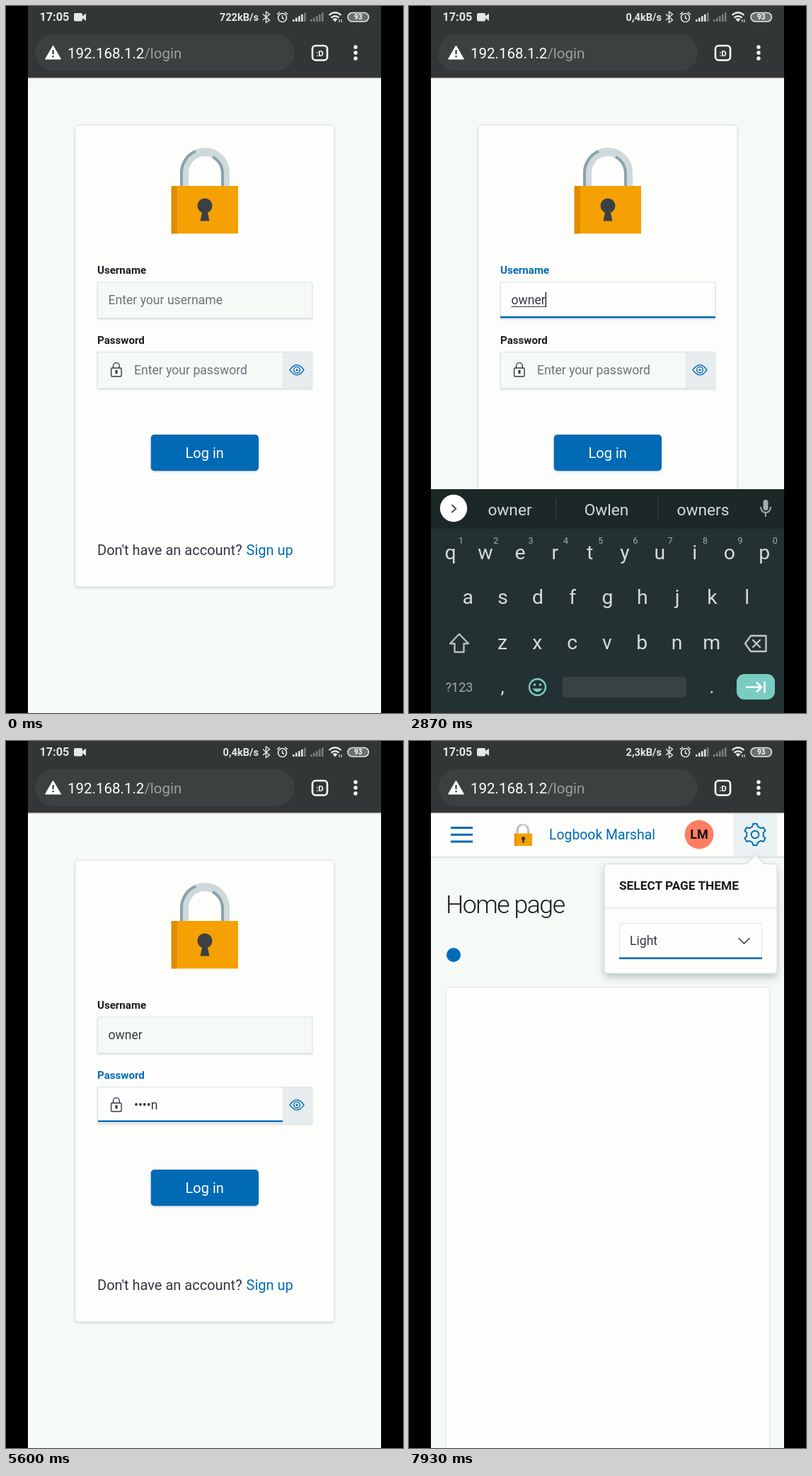
These frames come from a looping animation (561x998 px, 8 s). An HTML page:

```html
<!DOCTYPE html>
<html lang="en">
<head>
<meta charset="utf-8">
<title>Login on a phone</title>
<style>
html, body { margin: 0; width: 100%; height: 100%; overflow: hidden; background: #000; }
svg { display: block; width: 100vw; height: 100vh; font-family: Roboto, sans-serif; }
text { white-space: pre; }
</style>
</head>
<body>
<svg id="stage" viewBox="0 0 561 998"></svg>
<script>
const LOOP = 8000;
const BLUE = '#006bb4', INK = '#343741', DARK = '#1a1c21', HINT = '#6c737c';
const PAGE = '#f6faf7', CARD = '#fdfdfb', KEY = '#d6dada', TOOL = '#a6abac', STRIP = '#1c2728';

// Markup helpers
const text = (x, y, s, size, fill, more = '') =>
  `<text x="${x}" y="${y}" font-size="${size}" fill="${fill}" ${more}>${s}</text>`;
const rect = (x, y, w, h, fill, more = '') =>
  `<rect x="${x}" y="${y}" width="${w}" height="${h}" fill="${fill}" ${more}/>`;
const disc = (x, y, r, fill, more = '') => `<circle cx="${x}" cy="${y}" r="${r}" fill="${fill}" ${more}/>`;
const line = (d, stroke, w = 2, more = '') =>
  `<path d="${d}" fill="none" stroke="${stroke}" stroke-width="${w}" ${more}/>`;
const shape = (d, fill, more = '') => `<path d="${d}" fill="${fill}" ${more}/>`;
const group = (id, body, more = '') => `<g id="${id}" ${more}>${body}</g>`;
const MID = 'text-anchor="middle"', BOLD = 'font-weight="700"', ROUND = 'stroke-linejoin="round" stroke-linecap="round"';

function gear(cx, cy, r, depth, teeth) {
  const pts = [];
  for (let i = 0; i < teeth; i++) {
    [[-.3, 1 - depth], [-.17, 1], [.17, 1], [.3, 1 - depth]].forEach(([o, k]) => {
      const a = (i + o) / teeth * 2 * Math.PI - Math.PI / 2;
      pts.push((cx + r * k * Math.cos(a)).toFixed(1) + ' ' + (cy + r * k * Math.sin(a)).toFixed(1));
    });
  }
  return 'M' + pts.join('L') + 'Z';
}

const padlock =
  line('M252 255V235A29 29 0 0 1 310 235V255', '#cfd9dc', 12) +
  line('M248 255V235A33 33 0 0 1 268 205', '#8ba2a9', 4) +
  line('M306 255V236A26 26 0 0 0 292 213', '#8ba2a9', 4) +
  rect(233.7, 254, 94.3, 67.3, '#f5a103') + rect(233.7, 254, 8.3, 67.3, '#e08c02') +
  disc(281, 282, 10.5, '#3c4045') + shape('M278 287H284L287.5 303.5H274.5Z', '#3c4045');

function statusBar() {
  const c = '#e6e7e7';
  const bars = (x, n) => [0, 1, 2, 3, 4].map(i =>
    rect(x + i * 4, 19 - i * 2.4, 2.6, 3 + i * 2.4, i < n ? c : '#797d7e')).join('');
  return rect(31, 0, 499, 101.3, '#323637') +
    text(47.5, 21, '17:05', 16.2, c, 'font-weight="600"') +
    rect(96, 10, 12, 11.5, c, 'rx="2"') + shape('M107 15L113 10.5V21L107 16.5Z', c) +
    text(357, 21, '', 14.6, c, 'id="rate" text-anchor="end" font-weight="600"') +
    line('M363 11.5L372.5 20L367.5 23.5V8L372.5 11.5L363 20', c, 1.4) +
    disc(390.5, 16.5, 6, 'none', `stroke="${c}" stroke-width="1.7"`) +
    line('M390.5 13V17L393 18.5M383 12L387 8.5M398 12L394 8.5', c, 1.5) +
    bars(405, 4) + bars(430, 0) +
    line('M456.5 13Q465 5.5 473.5 13M459.5 16.5Q465 12 470.5 16.5', c, 2.3) +
    shape('M461.5 18.5Q465 16 468.5 18.5L465 22.5Z', c) +
    line('M471 19V23M474 19V23', c, 1.2) +
    rect(483, 9.5, 29.5, 12.5, '#6b7071', `rx="6.2" stroke="${c}" stroke-width="1.6"`) +
    text(497.7, 19.3, '93', 10, '#fff', MID + ' font-weight="600"') +
    rect(41, 40, 367, 52, '#3b4041', 'rx="26"') +
    shape('M66.5 56L77.5 75H55.5Z', '#fff', 'stroke="#fff" stroke-linejoin="round"') +
    rect(65.4, 62, 2.3, 6, '#3b4041') + rect(65.4, 70, 2.3, 2.3, '#3b4041') +
    text(87, 74, '192.168.1.2<tspan fill="#9c9fa0">/login</tspan>', 20.5, '#fff') +
    rect(433, 56, 21, 20.5, 'none', 'rx="4.5" stroke="#fff" stroke-width="2.6"') +
    text(443.5, 70.5, ':D', 11.5, '#fff', MID + ' ' + BOLD) +
    [58, 66, 74].map(y => disc(494, y, 2.7, '#fff')).join('');
}

function loginPage() {
  const field = (id, y, h) =>
    rect(129.5, y, 303, h, PAGE, `id="${id}" stroke="#d9e4e7" filter="url(#soft)"`);
  return rect(31, 101, 499, 897, PAGE) +
    rect(97.5, 168, 366.5, 652, CARD, 'rx="4.5" stroke="#d9dfe0" filter="url(#soft)"') + padlock +
    text(129, 378, 'Username', 15.1, DARK, 'id="userLabel" ' + BOLD) +
    field('userField', 390, 50.5) + rect(129, 438, 304, 2.5, BLUE, 'id="userLine"') +
    text(144.5, 420.5, '', 17.6, INK, 'id="userText"') +
    rect(144.5, 424, 0, 1, INK, 'id="compose"') + rect(193, 404, 1.2, 21, '#000', 'id="caret"') +
    text(129, 477, 'Password', 15.1, DARK, 'id="passLabel" ' + BOLD) +
    field('passField', 488.5, 51) + rect(390.5, 489, 42, 50.5, '#e7ecef') +
    rect(130, 535.5, 261, 2.5, BLUE, 'id="passLine"') +
    rect(148.6, 511, 14.5, 12, 'none', `rx="1.5" stroke="${INK}" stroke-width="1.4"`) +
    line('M151.5 511V508A4.4 4.4 0 0 1 160.3 508V511', INK, 1.4) + rect(154.5, 514, 3, 5, INK) +
    text(181, 519.5, '', 17.6, INK, 'id="passText"') +
    line('M401 513.7Q411 499.5 421 513.7Q411 528 401 513.7Z', BLUE, 1.4) +
    disc(411, 513.7, 4.3, 'none', `stroke="${BLUE}" stroke-width="1.4"`) + disc(411, 513.7, 1.5, BLUE) +
    rect(204.7, 605, 152.3, 51.3, BLUE, 'rx="5" filter="url(#soft)"') +
    text(280.7, 638, 'Log in', 20, '#fff', MID) +
    text(129, 775, "Don't have an account?", 20, INK) + text(339.5, 775, 'Sign up', 20, BLUE);
}

function homePage() {
  const icons = line('M59 122.5H90M59 132.3H90M59 142H90', BLUE, 3) +
    line(gear(489, 132, 15.5, .23, 6), BLUE, 1.9, ROUND) +
    disc(489, 132, 5.3, 'none', `stroke="${BLUE}" stroke-width="1.9"`) + disc(63, 302, 10, BLUE);
  const popover =
    shape('M280 173.5H477.5L489.5 161L501.5 173.5H516Q520 173.5 520 177.5V324Q520 328 516 328H280Q276 328 276 324V177.5Q276 173.5 280 173.5Z',
      CARD, 'stroke="#d5dce0" filter="url(#deep)"') +
    text(297, 210, 'SELECT PAGE THEME', 17.3, DARK, BOLD) +
    rect(276.5, 235.5, 243, 1.2, '#d9dfe6') +
    rect(297.5, 257.5, 201, 50, '#fefefe', 'stroke="#dfe6ea"') + rect(297, 305.4, 202, 2.5, BLUE) +
    text(312, 288, 'Light', 17.6, INK) + line('M466 278.5L473.5 286L481 278.5', INK, 1.6, ROUND);
  return rect(31, 101, 499, 897, PAGE) +
    rect(31, 101, 499, 62, CARD, 'filter="url(#soft)"') + rect(31, 163, 499, 1, '#d9dce2') +
    rect(458, 102, 62, 60.5, '#eaf1f2', 'id="gearBack"') +
    `<g transform="translate(86.8 64.5) scale(.266 .26)">${padlock}</g>` +
    text(198, 139, 'Logbook Marshal', 19.4, BLUE) +
    disc(410, 132, 20.4, '#ff7e62') + text(410, 138.3, 'LM', 18, '#111', MID + ' font-weight="600"') +
    text(52, 243, 'Home page', 35.6, DARK, 'font-weight="300" letter-spacing="-1.45"') +
    rect(52, 347.5, 457.5, 680, CARD, 'rx="4.5" stroke="#d8e6e3"') +
    group('icons', icons) + group('popover', popover);
}

function keyboard() {
  const col = (i, x = 58.5) => x + i * 49.3;
  const row = (s, x, y) => [...s].map((c, i) => text(col(i, x), y, c, 28.4, KEY, MID + ' class="letter"')).join('');
  const digits = [...'1234567890'];
  const mic = rect(500.5, 697, 7, 15, TOOL, 'rx="3.5"') +
    line('M497 707Q497.5 715 504 715Q510.5 715 511 707M504 715V721', TOOL, 2);
  const tools = line('M66 704L60.5 709.5L66 715', '#50585b', 2.2) +
    line('M121 700H136Q138 700 138 702V712L130 719H121Q119 719 119 717V702Q119 700 121 700Z', TOOL, 2.3, ROUND) +
    shape('M130 719V712H138Z', TOOL) + disc(125, 705.5, 1.4, TOOL) + disc(132, 705.5, 1.4, TOOL) +
    shape('M123.5 709H133.5Q128.500 716 123.500 709Z', TOOL) +
    text(199.8, 716, 'GIF', 17.5, TOOL, MID + ' font-weight="900" letter-spacing="1.3"') +
    rect(263, 700, 18, 20, 'none', `rx="2" stroke="${TOOL}" stroke-width="2.2"`) +
    rect(267.5, 697, 9, 7, TOOL, 'rx="2"') + line('M266.5 708H277.5M266.5 712H277.5M266.5 716H274', TOOL, 1.6) +
    shape(gear(344, 710, 11.5, .24, 6), TOOL, 'stroke-linejoin="round" stroke="' + TOOL + '"') + disc(344, 710, 4, STRIP) +
    rect(387.5, 695, 1, 29, '#384242') + [425, 432.5, 440].map(x => disc(x, 710, 2.5, TOOL)).join('');
  const hints = line('M60.5 704L66 709.5L60.5 715', '#50585b', 2.2) +
    [142.5, 279, 415.5].map((x, i) => text(x, 718.5, '', 22.7, KEY, MID + ` id="hint${i}"`)).join('') +
    [207, 351.5].map(x => rect(x, 695, 1, 29, '#384242')).join('');
  const fill = rect(31, 620.5, 499, 62, '#323637') +
    disc(396.5, 651, 4.8, 'none', 'stroke="#fff" stroke-width="4"') + line('M401 651H416M411.5 651V658', '#fff', 4.4) +
    rect(442, 641.5, 24, 19, 'none', 'rx="2" stroke="#fff" stroke-width="2.4"') + rect(442, 645, 24, 4.5, '#fff') +
    line('M504.5 662Q496.5 653 496.5 648A8 8 0 0 1 512.5 648Q512.5 653 504.5 662Z', '#fff', 2.3) + disc(504.5, 648, 2.8, '#fff');
  return group('fillBar', fill) + rect(31, 682, 499, 316, '#243132') + rect(31, 682, 499, 56, STRIP) +
    group('strip', disc(63, 709, 19.2, '#fff') + group('tools', tools) + group('hints', hints) + mic) +
    group('digits', digits.map((d, i) => text(col(i), 721, d, 28.5, KEY, MID)).join('')) +
    group('corners', digits.map((d, i) => text(col(i) + 15, 759, d, 12.5, TOOL, MID)).join('')) +
    row('qwertyuiop', 58.5, 780.5) + row('asdfghjkl', 83.3, 843.8) + row('zxcvbnm', 132, 907.5) +
    line('M71 886.5L84 900H77.5V912H64.5V900H58Z', '#b9bebf', 2.3, ROUND) +
    line('M483 889H504.5V911H483L475 900ZM486 895L496 905M496 895L486 905', '#c3c8c9', 2.3, ROUND) +
    text(71, 968, '?123', 18, TOOL, MID) + text(132, 970, ',', 26, KEY, MID) + text(428, 970, '.', 26, KEY, MID) +
    rect(217, 947, 174.5, 29, '#374343', 'id="space" rx="4"') +
    group('smile', disc(181.5, 961.5, 11.5, 'none', 'stroke="#7accc2" stroke-width="2.3"') +
      disc(177.5, 958, 1.8, '#7accc2') + disc(185.5, 958, 1.8, '#7accc2') + shape('M174.5 963.5H188.5Q181.5 973 174.5 963.5Z', '#7accc2')) +
    rect(463, 943, 54, 36, '#7accc2', 'rx="11"') +
    line('', '#fff', 2.5, 'id="enter"');
}

stage.innerHTML =
  `<defs>
    <filter id="soft" x="-5%" y="-10%" width="110%" height="125%"><feDropShadow dx="0" dy="1.5" stdDeviation="1.2" flood-color="#50606a" flood-opacity=".2"/></filter>
    <filter id="deep" x="-15%" y="-15%" width="130%" height="140%"><feDropShadow dx="0" dy="5" stdDeviation="5.5" flood-color="#50606a" flood-opacity=".35"/></filter>
    <clipPath id="screen"><rect x="31" y="0" width="499" height="998"/></clipPath>
  </defs>` + rect(0, 0, 561, 998, '#000') +
  group('phone',
    group('login', loginPage()) + group('home', homePage()) +
    rect(31, 681.5, 499, 317, CARD, 'id="blank"') + group('keys', keyboard()) +
    rect(31, 101, 499, 1.6, '#8a6a60', 'opacity=".25"') + statusBar(), 'clip-path="url(#screen)"');

const el = id => document.getElementById(id);
const set = (id, name, v) => el(id).setAttribute(name, v);
const show = (id, on) => set(id, 'visibility', on ? 'inherit' : 'hidden');
const clamp = x => Math.min(1, Math.max(0, x));
const easeOut = x => 1 - (1 - x) ** 3;
const letters = [...document.querySelectorAll('.letter')].map(node => ({ node, low: node.textContent }));

const USER = 'owner', PASS = 'melon';
const userKeys = [1680, 1920, 2160, 2400, 2620], passKeys = [4220, 4460, 4700, 4920, 5130];
const typed = (keys, t) => keys.filter(k => t >= k).length;

function render(t) {
  const atUser = t >= 800 && t < 3260, atPass = t >= 3260, home = t >= 6400;
  el('rate').textContent = t < 2000 ? '722kB/s' : t < 6050 ? '0,4kB/s' : '2,3kB/s';
  show('login', !home);
  show('home', home);

  // User name
  const n = typed(userKeys, t), name = USER.slice(0, n);
  el('userText').textContent = name || 'Enter your username';
  set('userText', 'fill', n ? INK : HINT);
  set('userLabel', 'fill', atUser ? BLUE : DARK);
  set('userField', 'fill', atUser ? '#fefefe' : PAGE);
  show('userLine', atUser && !home);
  const w = n ? el('userText').getComputedTextLength() : 0;
  set('compose', 'width', atUser ? w : 0);
  set('caret', 'x', 144.5 + w);
  const since = t - (n ? userKeys[n - 1] : 800);
  show('caret', atUser && since % 1000 < 500 && !(t > 1050 && t < 1300));

  // Password: only the newest letter is readable
  const m = typed(passKeys, t);
  el('passText').textContent = m ? '•'.repeat(m - 1) + PASS[m - 1] : 'Enter your password';
  set('passText', 'fill', m ? INK : HINT);
  set('passLabel', 'fill', atPass ? BLUE : DARK);
  set('passField', 'fill', atPass ? '#fefefe' : PAGE);
  show('passLine', atPass && !home);

  // Keyboard
  const up = easeOut(clamp((t - 1051) / 300)), down = clamp((t - 5340) / 200) ** 2;
  const open = t >= 1051 && t < 5540, numbers = t >= 3320;
  show('keys', open);
  show('blank', t >= 1051 && t < 5340);
  set('keys', 'transform', `translate(0 ${Math.round(316 * (1 - up) + 378 * down)})`);
  show('fillBar', t >= 3600 && open);
  show('strip', !numbers && open);
  show('tools', !n && !numbers && open);
  show('hints', n && !numbers && open);
  show('digits', numbers && open);
  show('corners', !numbers && open);
  show('smile', !numbers && open);
  set('space', 'x', numbers ? 168.5 : 217);
  set('space', 'width', numbers ? 223 : 174.5);
  set('enter', 'd', numbers ? 'M478 961.5H500M493 954L500.5 961.5L493 969'
    : 'M476 961.5H498M491 954.5L498 961.5L491 968.5M502.5 953.5V969.5');
  [name, 'Owlen', 'owners'].forEach((s, i) => { el('hint' + i).textContent = s; });
  letters.forEach(k => { k.node.textContent = t < 1400 ? k.low.toUpperCase() : k.low; });

  // Home page
  set('icons', 'opacity', t < 6680 ? .05 : 1);
  show('gearBack', home && t >= 7450);
  const pop = easeOut(clamp((t - 7500) / 250));
  set('popover', 'opacity', pop);
  set('popover', 'transform', `translate(0 ${10 * (1 - pop)})`);
}

function tick() {
  render(performance.now() % LOOP);
  requestAnimationFrame(tick);
}
tick();
</script>
</body>
</html>
```
